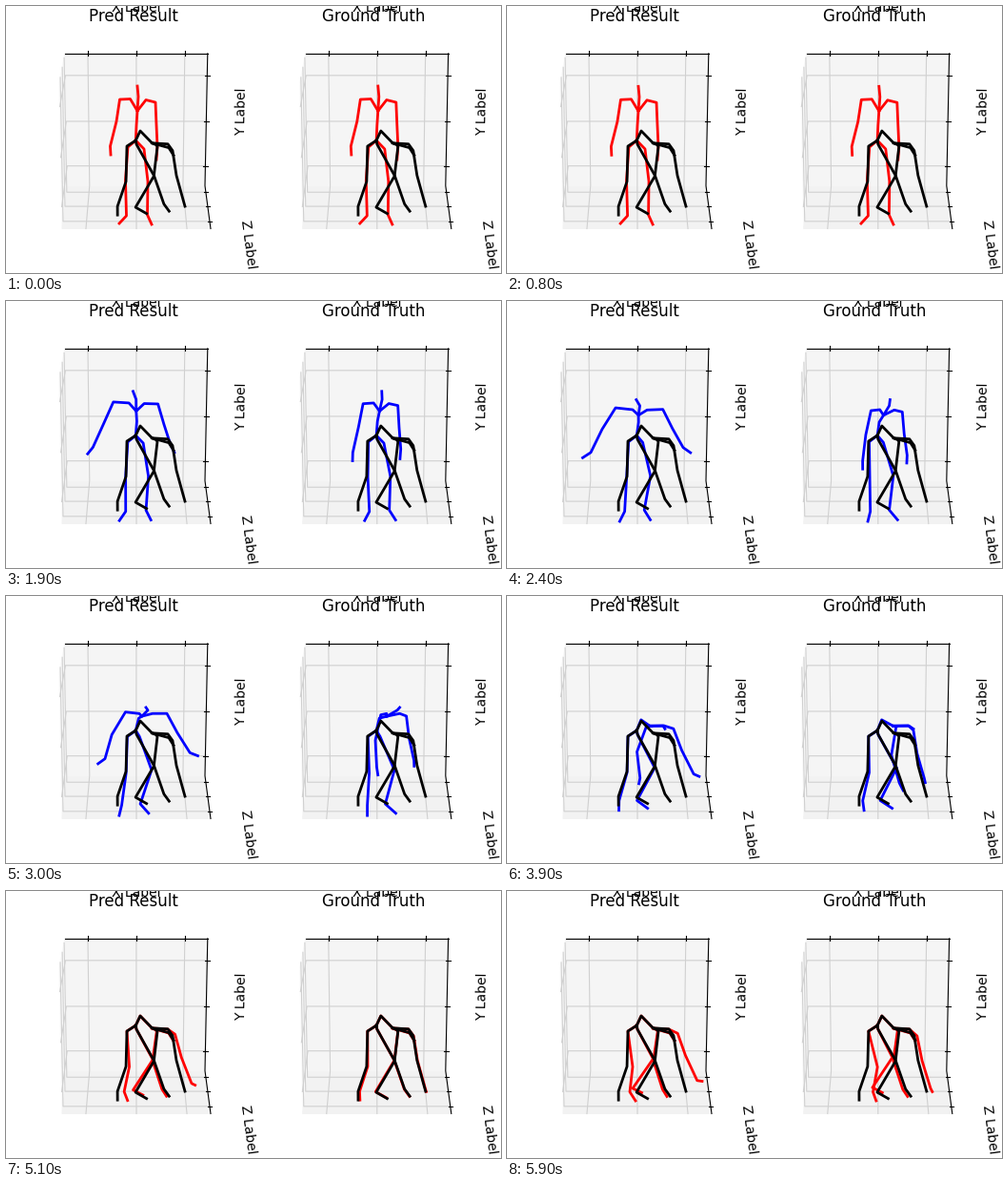
Recreate the animation shown at these times as a matplotlib script. Size 520 px wide and 280 px high, loop 6 s.

```python
import numpy as np
import matplotlib.pyplot as plt
from matplotlib.animation import FuncAnimation

W, H, DPI = 520, 280, 100
FRAMES, STEP_MS = 60, 100
BLUE_FROM, GOAL_TIME, END_TIME = 1.0, 5.0, 5.9
PANEL_DX = 252.8

plt.rcParams["font.family"] = "DejaVu Sans"
fig = plt.figure(figsize=(W / DPI, H / DPI), dpi=DPI, facecolor="white")
ax = fig.add_axes([0, 0, 1, 1])
ax.set_xlim(0, W)
ax.set_ylim(H, 0)
ax.axis("off")


def mix(a, b, t):
    return a + (b - a) * t


def smooth(start, end, t):
    u = np.clip((t - start) / (end - start), 0, 1)
    return u * u * (3 - 2 * u)


def stroke(pts, dx, color, width, z):
    pts = np.asarray(pts, float)
    line, = ax.plot(pts[:, 0] + dx, pts[:, 1], color=color, lw=width, zorder=z,
                    solid_capstyle="projecting", solid_joinstyle="round")
    return line


# ---- the box seen in perspective -------------------------------------------
TOP_L, TOP_R = np.array([62, 49.8]), np.array([211.8, 49.8])
MID_L, MID_R = np.array([64.7, 188.5]), np.array([209, 188.5])
LOW_L, LOW_R = np.array([59, 233.5]), np.array([215, 233.5])
FRONT = np.array([56, 80])
X_FRAC, Y_FRAC, Z_FRAC = (0.16, 0.5, 0.84), (0.166, 0.513, 0.85), (0.15, 0.48, 0.83)


def tick(at, step, dx):
    stroke([at - np.multiply(step, 0.8), at + step], dx, "black", 0.8, 3)


def draw_box(dx, title):
    panes = (((TOP_L, MID_L, LOW_L, FRONT), 0.975),
             ((MID_L, MID_R, LOW_R, LOW_L), 0.95),
             ((TOP_L, TOP_R, MID_R, MID_L), 0.9625))
    for corners, gray in panes:
        c = np.array(corners)
        ax.fill(c[:, 0] + dx, c[:, 1], color=str(gray), lw=0.8, zorder=1)

    def grid(*pts):
        stroke(pts, dx, "#d0d0d0", 0.8, 2)

    for t in X_FRAC:
        top = mix(TOP_L, TOP_R, t)
        grid(top, mix(MID_L, MID_R, t), mix(LOW_L, LOW_R, t))
        tick(top, (0, -2.5), dx)
    for t in Y_FRAC:
        right = mix(TOP_R, MID_R, t)
        grid(right, mix(TOP_L, MID_L, t), mix(FRONT, LOW_L, t))
        tick(right, (2.5, 0), dx)
    for t in Z_FRAC:
        right = mix(MID_R, LOW_R, t)
        grid(right, mix(MID_L, LOW_L, t), mix(TOP_L, FRONT, t))
        tick(right, (2.5, 0), dx)

    stroke([TOP_L, TOP_R], dx, "black", 0.8, 3)
    stroke([TOP_R, MID_R, LOW_R], dx, "black", 0.8, 3)

    ax.text(137.1 + dx, 6.5, "X Label", fontsize=10, ha="center", va="baseline")
    for x, y, text, angle in ((247.7, 110.8, "Y Label", 89), (254.5, 249.8, "Z Label", -82.5)):
        ax.text(x + dx, y, text, fontsize=10, ha="center", va="center", rotation=angle)
    ax.text(133.6 + dx, 16.5, title, fontsize=12, ha="center", va="baseline")


# ---- the figure: bends from standing to the goal, then takes a step --------
ROOT = (136.3, 141)


class Limb:
    """A chain of joints; offsets grow from its base to its tip."""

    def __init__(self, stand, goal, arc, step, sway, base_sway=(0, 0), pred_step=None):
        self.stand, self.goal = np.array(stand, float), np.array(goal, float)
        self.arc, self.step, self.sway = arc, step, sway
        self.base_sway, self.pred_step = base_sway, pred_step or step
        self.weight = np.linspace(0, 1, len(stand))[:, None]

    def at(self, t, predicted):
        bend = smooth(0.6, 5.2, t)
        turn = smooth(1.3, 4.3, t)
        pts = mix(self.stand, self.goal, np.array([turn, bend]))
        pts += self.weight * self.arc * np.sin(np.pi * bend)
        if not predicted:
            walk = np.clip((t - GOAL_TIME) / (END_TIME - GOAL_TIME), 0, 1)
            return pts + np.sqrt(self.weight) * self.step * walk
        walk = np.clip((t - 3.9) / (END_TIME - 3.9), 0, 1)
        swing = smooth(1.1, 2.5, t) * (1 - smooth(2.8, 5.3, t))
        sway = mix(np.array(self.base_sway), np.array(self.sway), self.weight)
        return pts + self.weight * self.pred_step * walk + sway * swing


R_LEG = Limb([(128, 148), (125.5, 183), (126.5, 220), (119, 228)],
             [(127, 147), (126, 184), (117, 210), (117, 219)],
             arc=(9, 7), step=(18, 1), sway=(-8, 0))
L_LEG = Limb([(145, 150), (149, 184), (148.5, 219), (153, 229)],
             [(137, 145), (155.5, 178), (136, 211), (147.5, 217.5)],
             arc=(7, 5), step=(-6, -6), sway=(-7, 0))
SPINE = Limb([(137, 125), (138, 110), (139, 95), (138, 84)],
             [(141, 131), (153.5, 144), (171, 149), (176, 157)],
             arc=(0, -6), step=(0, 0), sway=(-14, 0))
R_ARM = Limb([(130.5, 97.5), (119.5, 98), (116, 121), (109.5, 147), (110, 156)],
             [(158, 146), (159, 148), (155.5, 178), (166, 208), (171.5, 215.5)],
             arc=(-9, 0), step=(-3.5, 0), sway=(-42, -12), base_sway=(-7, 0))
L_ARM = Limb([(147, 98.5), (157, 101), (158, 125), (159, 147.5), (158, 161)],
             [(170, 145), (175, 152), (179, 178), (187, 207), (188, 210.5)],
             arc=(0, -9), step=(6, 0), sway=(26, -11), base_sway=(-7, 0),
             pred_step=(17, -11))


def skeleton(t, predicted):
    r_leg, l_leg, spine, r_arm, l_arm = (
        limb.at(t, predicted) for limb in (R_LEG, L_LEG, SPINE, R_ARM, L_ARM))
    neck = spine[1]
    return [np.vstack(chain) for chain in (
        (ROOT, r_leg), (ROOT, l_leg), (ROOT, spine), (neck, r_arm), (neck, l_arm))]


PANELS = ((True, 0, "Pred Result"), (False, PANEL_DX, "Ground Truth"))

moving = []
for predicted, dx, title in PANELS:
    draw_box(dx, title)
    moving.append([stroke(chain, dx, "red", 2, 4) for chain in skeleton(0, predicted)])
    for chain in skeleton(GOAL_TIME, False):
        stroke(chain, dx, "black", 2, 5)


def update(frame):
    t = frame * STEP_MS / 1000
    color = "blue" if BLUE_FROM <= t < GOAL_TIME else "red"
    for (predicted, dx, _), lines in zip(PANELS, moving):
        for line, chain in zip(lines, skeleton(t, predicted)):
            line.set_data(chain[:, 0] + dx, chain[:, 1])
            line.set_color(color)
    return [line for lines in moving for line in lines]


anim = FuncAnimation(fig, update, frames=FRAMES, interval=STEP_MS, repeat=True,
                     repeat_delay=0, blit=False)
plt.show()
```
